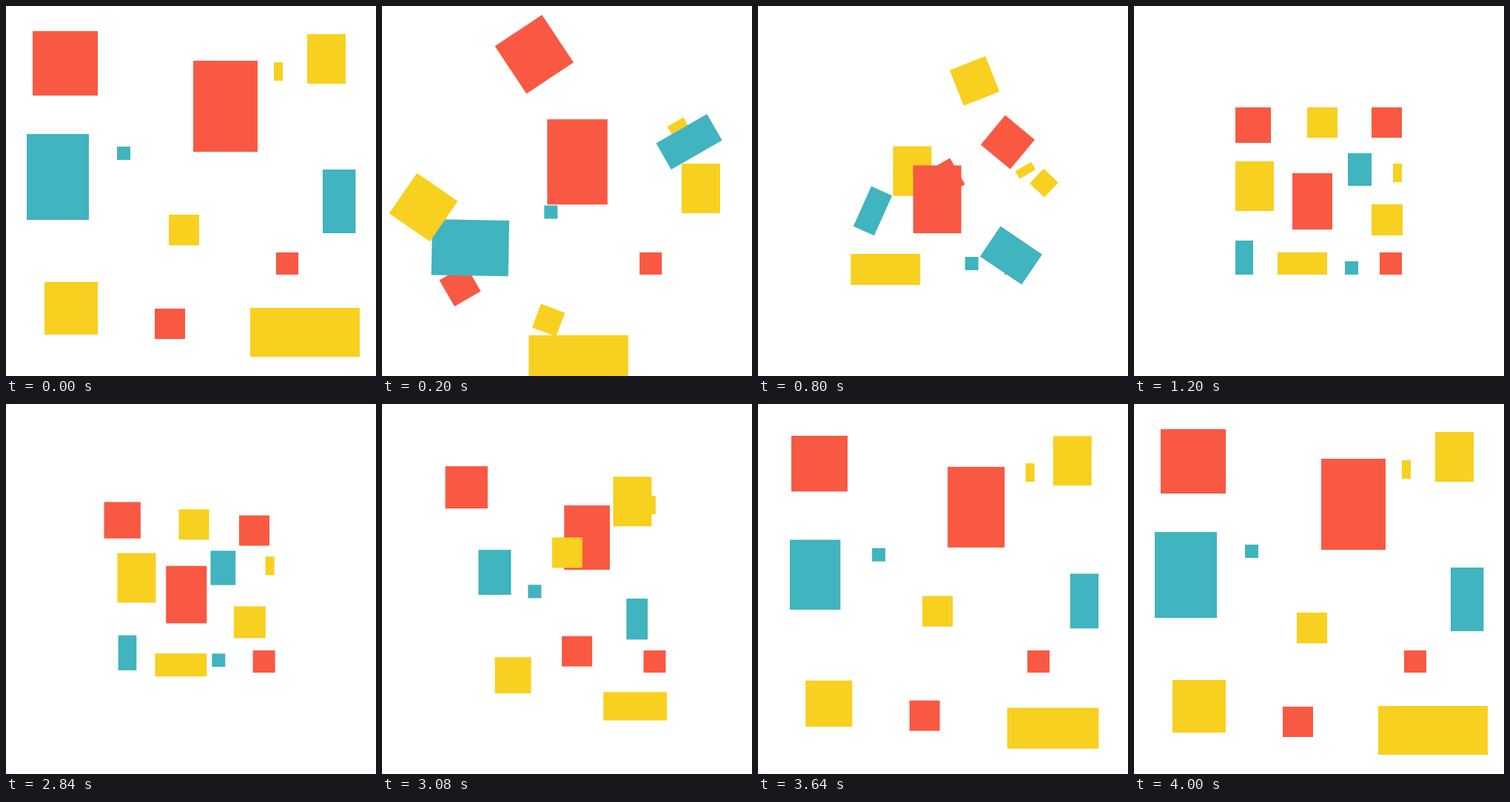
Write an HTML page with a canvas that moves like this. It is 500 by 500 pixels and loops after 5 s.

```html
<!DOCTYPE html>
<html lang="en">
<head>
<meta charset="utf-8">
<title>Gathering blocks</title>
<style>
  html, body { margin: 0; width: 100%; height: 100%; overflow: hidden; background: #fff; }
  canvas { display: block; width: 500px; height: 500px; }
</style>
</head>
<body>
<canvas id="stage" width="500" height="500"></canvas>
<script>
const ctx = document.getElementById('stage').getContext('2d');
const LOOP = 5000, STEP = 40, MOVE = 1200, RETURN_AT = 2800;
const RED = '#f95843', TEAL = '#40b4bf', YELLOW = '#f8d01f';

// Moments of the gathering move at which curved paths meet their via points.
const VIA_TIMES = [200 / MOVE, 520 / MOVE];

const mix = (a, b, k) => a + (b - a) * k;
const cubic = (a, b, t) => 3 * a * (1 - t) ** 2 * t + 3 * b * (1 - t) * t * t + t ** 3;

function bezier(x1, y1, x2, y2) {
  return x => {
    if (x <= 0 || x >= 1) return Math.min(1, Math.max(0, x));
    let low = 0, high = 1;
    for (let i = 0; i < 30; i++) {
      const mid = (low + high) / 2;
      if (cubic(x1, x2, mid) < x) low = mid; else high = mid;
    }
    return cubic(y1, y2, low);
  };
}

const landing = x2 => bezier(0.167, 0.167, x2, 1);
const linear = x => x;
const rush = landing(0);
const brisk = landing(0.25);
const gentle = landing(0.667);
const swing = bezier(0.167, 0, 0.42, 1);

// from / to: centre x, centre y, width, height
const blocks = [
  { color: RED, from: [221.5, 429.5, 41, 41], to: [341.5, 157.5, 41, 41],
    via: [[105.5, 378], [136, 305]], ease: gentle, turn: 360 },
  { color: YELLOW, from: [368, 88.5, 12, 25], to: [356, 225.5, 12, 25],
    via: [[399.5, 162], [374.2, 211.5]], turn: 360 },
  { color: YELLOW, from: [433, 71.5, 52, 67], to: [163, 243.5, 52, 67],
    via: [[431, 246.5], [302.3, 211.5]], ease: brisk },
  { color: TEAL, from: [159, 199, 18, 18], to: [294, 354, 18, 18] },
  { color: RED, from: [380, 348, 30, 30], to: [347, 348, 30, 30] },
  { color: TEAL, from: [70, 231, 84, 116], to: [305, 221, 32, 44],
    via: [[119.3, 326.7], [276.8, 394.3]], ease: gentle,
    turn: 360, turnEase: bezier(0.33, 0.52, 0.7, 1) },
  { color: RED, from: [80, 77.5, 88, 87], to: [161, 161, 48, 48],
    via: [[205.7, 65.3], [373.5, 141.5]], ease: gentle, turn: 270, turnEase: gentle,
    sizeEase: landing(0.4), returnEase: landing(0.1) },
  { color: YELLOW, from: [88, 408.5, 72, 71], to: [342, 289, 42, 42],
    via: [[56, 272], [173.8, 74.5]], ease: gentle, turn: 180, turnEase: swing },
  { color: RED, from: [296.5, 135.5, 87, 123], to: [241, 264, 54, 76],
    ease: bezier(0.25, 0.58, 0, 1) },
  { color: YELLOW, from: [404, 441, 148, 66], to: [227.5, 348, 67, 30],
    via: [[265.5, 475], [91.5, 381]] },
  { color: TEAL, from: [450.2, 264, 44.5, 86], to: [149, 340, 24, 46],
    via: [[415, 183.5], [253, 199.5]], ease: gentle, turn: -360, turnEase: brisk },
  { color: YELLOW, from: [240.5, 302.7, 41, 41.5], to: [254.5, 157.5, 41, 41],
    via: [[225, 424.5], [427, 382]], ease: swing, turn: -360, turnEase: swing,
    dip: true, returnEase: gentle }
];

// Cubic through four values at the given parameters.
function interpolate(knots, values, t) {
  return values.reduce((sum, value, i) => {
    const weight = knots.reduce((w, k, j) => j === i ? w : w * (t - k) / (knots[i] - k), 1);
    return sum + value * weight;
  }, 0);
}

function position({ from, to, via, ease = rush }, u) {
  const t = ease(u);
  return [0, 1].map(axis => via
    ? interpolate([0, ...VIA_TIMES.map(ease), 1],
        [from[axis], via[0][axis], via[1][axis], to[axis]], t)
    : mix(from[axis], to[axis], t));
}

function drawBlock(color, x, y, w, h, degrees = 0) {
  ctx.save();
  ctx.translate(x, y);
  ctx.rotate(degrees * Math.PI / 180);
  ctx.fillStyle = color;
  ctx.fillRect(-w / 2, -h / 2, w, h);
  ctx.restore();
}

function gather(block, u) {
  const { color, from, to, turn = 0, turnEase = linear, sizeEase = linear, dip } = block;
  const [x, y] = position(block, u);
  const k = sizeEase(u);
  const scale = dip ? 0.5 + Math.abs(u - 0.5) : 1;
  drawBlock(color, x, y, mix(from[2], to[2], k) * scale, mix(from[3], to[3], k) * scale,
    u < 1 ? turn * turnEase(u) : 0);
}

function scatter({ color, from, to, returnEase = rush }, u) {
  const p = returnEase(u);
  drawBlock(color, mix(to[0], from[0], p), mix(to[1], from[1], p),
    mix(to[2], from[2], u), mix(to[3], from[3], u));
}

function render(now) {
  const time = Math.floor((now % LOOP) / STEP) * STEP;
  ctx.fillStyle = '#fff';
  ctx.fillRect(0, 0, 500, 500);
  for (const block of blocks) {
    if (time <= RETURN_AT) gather(block, Math.min(1, time / MOVE));
    else scatter(block, Math.min(1, (time - RETURN_AT) / MOVE));
  }
}

let start;
function tick(now) {
  start ??= now;
  render(now - start);
  requestAnimationFrame(tick);
}
render(0);
requestAnimationFrame(tick);
</script>
</body>
</html>
```
